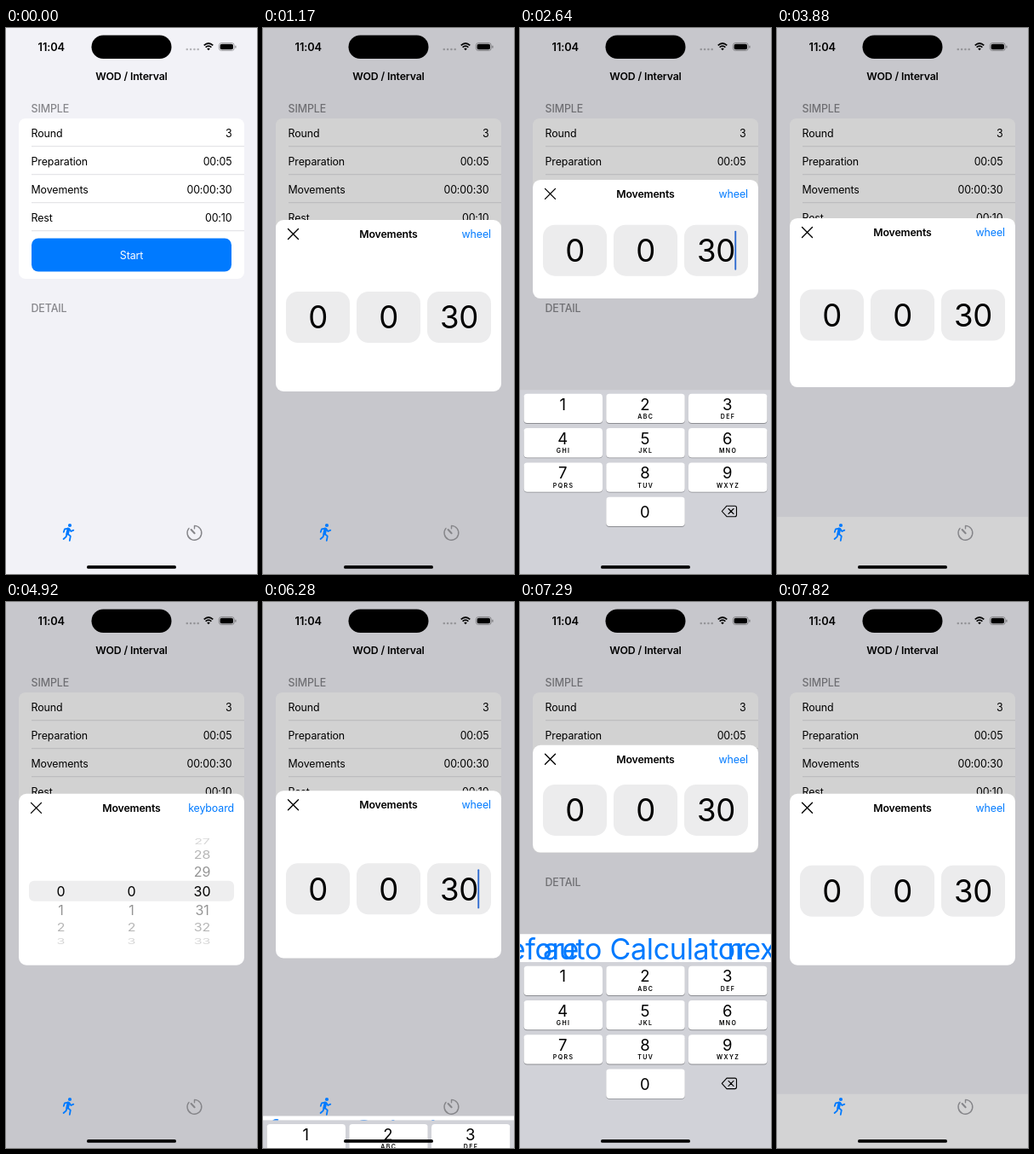
Animation, 295 px wide and 640 px high, one loop 8000 ms. Source, as an HTML page:

```html
<!DOCTYPE html>
<html lang="en">
<head>
<meta charset="utf-8">
<title>Interval timer</title>
<style>
html, body { margin: 0; width: 100%; height: 100%; overflow: hidden; background: #f2f2f7; }
svg { display: block; width: 100vw; height: 100vh; font-family: Inter, Roboto, "Liberation Sans", sans-serif; }
</style>
</head>
<body>
<svg id="stage" viewBox="0 0 295 640" xmlns="http://www.w3.org/2000/svg"></svg>
<script>
const LOOP = 8000;
const BLUE = '#007aff';

// Markup helpers; text is centred vertically on y.
const text = (str, x, y, o = {}) => {
  const { size = 12.4, anchor = 'start', weight = 400, fill = '#000', gap = -0.1, extra = '' } = o;
  return `<text x="${x}" y="${(y + size * 0.363).toFixed(2)}" font-size="${size}" text-anchor="${anchor}"` +
    ` font-weight="${weight}" fill="${fill}" letter-spacing="${gap}" ${extra}>${str}</text>`;
};
const rect = (x, y, w, h, r, fill, extra = '') =>
  `<rect x="${x}" y="${y}" width="${w}" height="${h}" rx="${r}" fill="${fill}" ${extra}/>`;
const line = (d, stroke, width, extra = '') =>
  `<path d="${d}" fill="none" stroke="${stroke}" stroke-width="${width}" ${extra}/>`;
const group = (id, body, extra = '') => `<g id="${id}" ${extra}>${body}</g>`;
const ROUND = 'stroke-linecap="round" stroke-linejoin="round"';
const MID = { anchor: 'middle' };

function formView() {
  const rows = [['Round', '3'], ['Preparation', '00:05'], ['Movements', '00:00:30'], ['Rest', '00:10']];
  const head = { weight: 500, fill: '#86868b' };
  return rect(0, 0, 295, 640, 0, '#f2f2f7') +
    text('SIMPLE', 29.5, 94, head) +
    rect(15, 106, 265, 188, 8, '#fff') +
    rows.map(([name, value], i) => {
      const y = 123 + i * 33;
      return text(name, 29.5, y) + text(value, 265.5, y, { anchor: 'end' }) +
        line(`M30 ${y + 15.7}H280`, '#d2d2d6', 0.7);
    }).join('') +
    rect(30, 246.5, 235, 39, 8, BLUE) +
    text('Start', 147.5, 266, { ...MID, fill: '#fff' }) +
    text('DETAIL', 29.5, 328, head);
}

function statusBar() {
  const dots = [0, 1, 2, 3].map(i =>
    `<circle cx="${212.8 + i * 4.3}" cy="25" r="1.3" fill="#000" opacity=".25"/>`).join('');
  return text('11:04', 53.3, 22, { ...MID, size: 12.8, weight: 600 }) +
    rect(100.5, 8.5, 94, 27.5, 13.75, '#000') + dots +
    line('M232.7 20.3Q238 15.7 243.3 20.3M234.6 22.6Q238 19.7 241.4 22.6', '#000', 1.7) +
    '<path d="M236.2 24.3Q238 22.9 239.8 24.3L238 26.3Z"/>' +
    rect(250.3, 17.5, 18, 9, 3, 'none', 'stroke="#000" stroke-opacity=".4" stroke-width=".8"') +
    rect(251.6, 18.8, 15.4, 6.4, 1.9, '#000') +
    line('M269.9 20.7V23.6', '#000', 1.1, 'opacity=".45"') +
    text('WOD / Interval', 147.5, 57, { ...MID, size: 12.3, weight: 600, gap: -0.15 });
}

function tabIcons() {
  return `<circle cx="75" cy="583" r="2.1" fill="${BLUE}"/>` +
    line('M73.4 587.4L72.2 592.6', BLUE, 3.6, ROUND) +
    line('M72.6 586.6L69 587.4L67.8 590.8M74.5 587.2L76.4 590L79.3 588.6' +
      'M72.6 593L75.8 595.6L74.8 600.8M71.5 593L70.6 596.4L67.6 599', BLUE, 1.8, ROUND) +
    line('M221.5 586.8V583.4A8.4 8.4 0 1 1 215 586.4', '#858589', 1.4, ROUND) +
    line('M221.6 592.2L217.6 588', '#858589', 2, ROUND);
}

const COLS = [64.5, 147.5, 230.5];
const VALUES = [0, 0, 30];

// Parts of the dialog are drawn around their own origin and moved later.
function digitBoxes() {
  return COLS.map((x, i) => rect(x - 37.5, -30, 75, 60, 14, '#ececed') +
    text(VALUES[i], x, 0, { ...MID, size: 36.5, gap: -0.4 })).join('') +
    rect(252.3, -23, 1.9, 46, 0.9, '#2f6bd0', 'id="caret"');
}

function wheels() {
  let out = rect(27, -12, 241, 24, 6, '#eeeeef');
  COLS.forEach((x, c) => {
    for (let i = -3; i <= 3; i++) {
      const n = VALUES[c] + i;
      if (n < 0) continue;
      const a = i * 0.33;
      const place = `transform="translate(${x} ${(70 * Math.sin(a)).toFixed(1)}) scale(1 ${Math.cos(a).toFixed(2)})"`;
      out += text(n, 0, 0, { ...MID, size: 16, extra: `${place} opacity="${i ? 0.55 - Math.abs(i) * 0.13 : 1}"` });
    }
  });
  return out;
}

function dialog() {
  const link = { anchor: 'end', fill: BLUE };
  return rect(15, 0, 265, 0, 9, '#fff', 'id="panel"') +
    group('header', line('M29.5 -6L41.5 6M41.5 -6L29.5 6', '#000', 1.4, 'stroke-linecap="round"') +
      text('Movements', 147.5, 0, { ...MID, size: 12.3, weight: 600, gap: -0.15 }) +
      text('wheel', 268, 0, { ...link, extra: 'id="toWheel"' }) +
      text('keyboard', 268, 0, { ...link, extra: 'id="toKeys"' })) +
    group('boxes', digitBoxes()) + group('wheels', wheels());
}

function keypad() {
  const letters = ['', 'ABC', 'DEF', 'GHI', 'JKL', 'MNO', 'PQRS', 'TUV', 'WXYZ'];
  const key = (col, row, digit, sub) => {
    const x = 4.5 + col * 96.75, y = 4.6 + row * 40.3;
    return rect(x, y + 0.9, 92.5, 34.3, 4, '#8c8d92') + rect(x, y, 92.5, 34.3, 4, '#fff') +
      text(digit, x + 45.7, y + (digit ? 12 : 17.3), { ...MID, size: 18.5, gap: 0 }) +
      (sub ? text(sub, x + 46.6, y + 26.6, { ...MID, size: 7, weight: 600, gap: 1.4 }) : '');
  };
  return rect(0, 0, 295, 240, 0, '#d1d2d8') +
    letters.map((sub, i) => key(i % 3, Math.floor(i / 3), i + 1, sub)).join('') +
    key(1, 3, 0, '') +
    line('M243 136H252.5Q254.5 136 254.5 138V146.5Q254.5 148.5 252.5 148.5H243L237.3 142.3Z' +
      'M245 139.3L251 145.3M251 139.3L245 145.3', '#000', 1.1, ROUND);
}

function toolbar() {
  const o = { size: 34, fill: BLUE, gap: -0.3 };
  return rect(0, 0, 295, 34, 0, '#fff') +
    text('before', 69, 17, { ...o, anchor: 'end' }) +
    text('auto Calculator', 27, 17, o) + text('next', 243.5, 17, o);
}

document.getElementById('stage').innerHTML = formView() +
  rect(0, 0, 295, 640, 0, '#000', 'id="dim" opacity=".175"') +
  rect(0, 577, 295, 240, 0, '#d3d3d4', 'id="tabBack"') +
  statusBar() + tabIcons() + group('dialog', dialog()) +
  group('toolbar', toolbar()) + group('keypad', keypad()) +
  rect(95, 630, 105, 3.8, 1.9, '#000');

const el = {};
document.querySelectorAll('[id]').forEach(n => el[n.id] = n);
const show = (n, v) => n.setAttribute('opacity', +v);
const moveY = (n, y) => n.setAttribute('transform', `translate(0 ${y.toFixed(2)})`);
const mix = (a, b, p) => a + (b - a) * p;

// Critically damped spring, 0 to 1.
const spring = x => x <= 0 ? 0 : 1 - (1 + x) * Math.exp(-x);

// Index of the current step of a stepped transition, or -1 before it.
const step = (t, from, to, n) =>
  t < from ? -1 : Math.min(n - 1, Math.floor((t - from) / (to - from) * (n - 1) + 0.08));

const REST = { top: 225, height: 201, box: 339 };
const RAISED = { top: 177, height: 138, box: 259 };
const RAISED_BAR = { top: 167.5, height: 125.5, box: 243.5 };

// How far the keyboard, panel and boxes are raised, and the keyboard's drop.
function pose(t) {
  const second = t >= 6280;
  const up = second ? step(t, 6280, 6820, 6) : step(t, 2210, 2860, 7);
  const down = second ? step(t, 7290, 7820, 6) : step(t, 3560, 4100, 6);
  if (up < 0) return { drop: 1, panel: 0, box: 0, second, down };
  if (down < 0) {
    const x = 0.68 + 1.38 * up;
    return { drop: 1 - spring(x), panel: spring(x - 0.27), box: spring(x - 0.42), second, down };
  }
  const x = 0.1 + 1.6 * down;
  return { drop: 1.05 * spring(x), panel: 1 - spring(x), box: 1 - spring(x + (down ? 0.4 : 0)), second, down };
}

function render(t) {
  const open = t >= 1170;
  show(el.dim, open ? 0.175 : 0);
  show(el.dialog, open);

  const p = pose(t);
  const goal = p.second ? RAISED_BAR : RAISED;
  const top = mix(REST.top, goal.top, p.panel);
  el.panel.setAttribute('y', top);
  el.panel.setAttribute('height', mix(REST.height, goal.height, p.panel));
  moveY(el.header, top + 16.5);
  const boxY = mix(REST.box, goal.box, p.box);
  moveY(el.boxes, boxY);
  moveY(el.wheels, boxY);

  moveY(el.keypad, 421 + 219 * p.drop);
  moveY(el.toolbar, 388 + 252 * p.drop);
  show(el.keypad, p.drop < 1);
  show(el.toolbar, p.second && p.drop < 1);

  const toWheel = (step(t, 4360, 4920, 6) + 1) / 6;
  const toBoxes = (step(t, 5270, 5810, 6) + 1) / 6;
  const wheel = toWheel - toBoxes;
  show(el.wheels, wheel);
  show(el.toKeys, wheel);
  show(el.boxes, 1 - wheel);
  show(el.toWheel, 1 - wheel);

  el.tabBack.setAttribute('y', 577 - 90 * p.panel);
  show(el.tabBack, p.down < 0 ? 0 : p.second ? 1 : 1 - toWheel);
  show(el.caret, (t >= 2210 && t < 3150) || (t >= 6280 && t < 7140));
}

const start = performance.now();
function tick() {
  render((performance.now() - start) % LOOP);
  requestAnimationFrame(tick);
}
tick();
</script>
</body>
</html>
```
